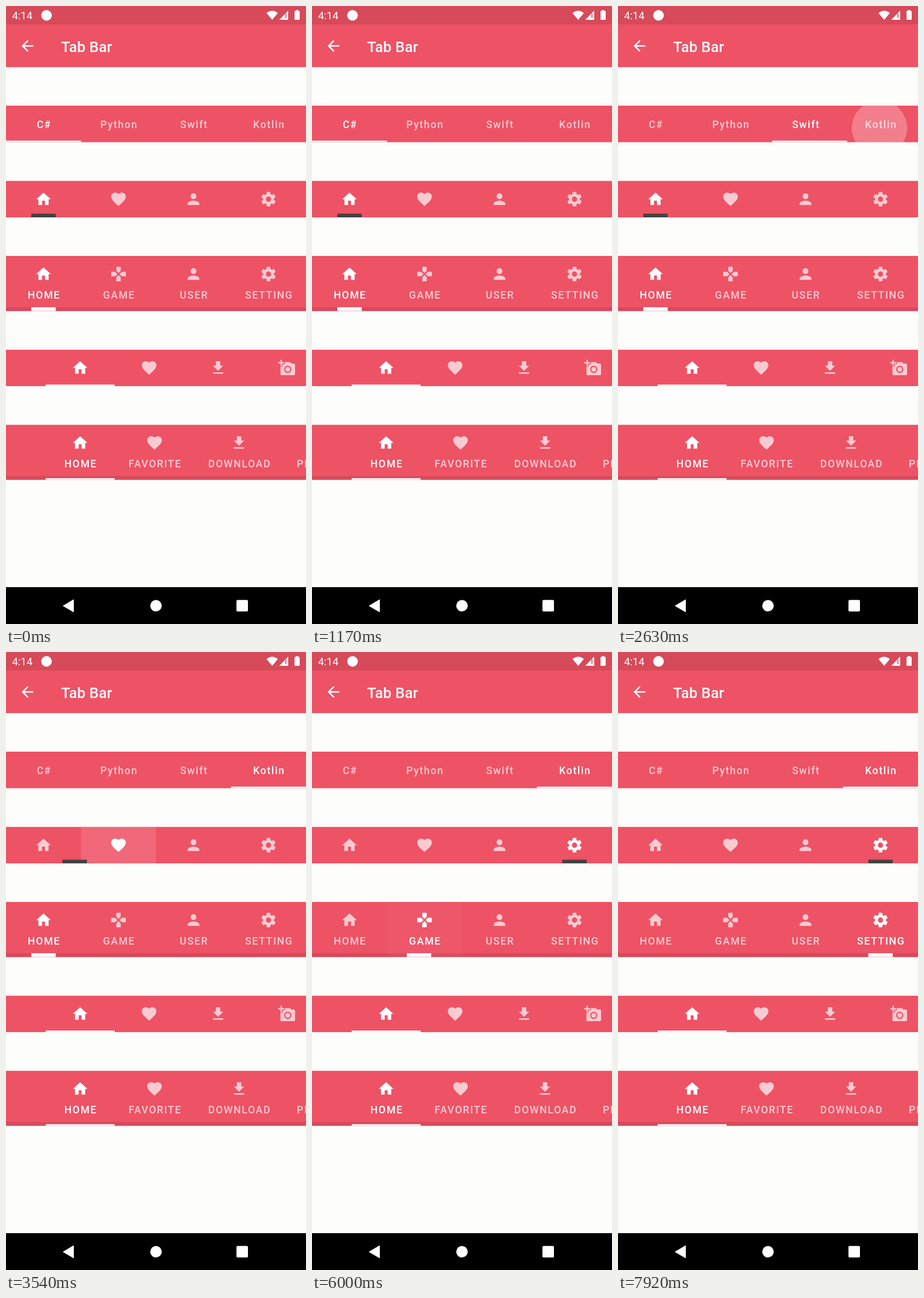
Animation, 522 px wide and 1073 px high, one loop 8 s. Source, as an HTML page:

```html
<!DOCTYPE html>
<html lang="en">
<head>
<meta charset="utf-8">
<title>Tab Bar</title>
<style>
  html, body { margin: 0; width: 100%; height: 100%; overflow: hidden; background: #fdfdfc; }
  svg { display: block; width: 522px; height: 1073px; }
  text { font-family: Roboto, "Noto Sans", sans-serif; fill: #fff; }
  .label { font-size: 17.8px; font-weight: 500; letter-spacing: 1.59px; }
  .mid { text-anchor: middle; }
</style>
</head>
<body>
<svg id="stage" viewBox="0 0 522 1073" xmlns="http://www.w3.org/2000/svg"></svg>
<script>
const RED = '#ee5265', DARK_RED = '#d64a5a', WHITE = '#fff';
const LOOP = 8000, TAB = 130.5, DIM = 0.7, DP = 1.27;
const stage = document.getElementById('stage');

const ICONS = {
  back: 'M20 11H7.83l5.59-5.59L12 4l-8 8 8 8 1.41-1.41L7.83 13H20z',
  home: 'M10 20v-6h4v6h5v-8h3L12 3 2 12h3v8z',
  heart: 'M12 21.35l-1.45-1.32C5.4 15.36 2 12.28 2 8.5 2 5.42 4.42 3 7.5 3c1.74 0 3.41.81 4.5 2.09' +
    'C13.09 3.81 14.76 3 16.5 3 19.58 3 22 5.42 22 8.5c0 3.78-3.4 6.86-8.55 11.54z',
  user: 'M12 12a4 4 0 1 0 0-8 4 4 0 0 0 0 8zm0 2c-2.67 0-8 1.34-8 4v2h16v-2c0-2.66-5.33-4-8-4z',
  game: 'M15 7.5V2H9v5.5l3 3zM7.5 9H2v6h5.5l3-3zM9 16.5V22h6v-5.5l-3-3zM16.5 9l-3 3 3 3H22V9z',
  download: 'M19 9h-4V3H9v6H5l7 7zM5 18v2h14v-2z',
  camera: 'M3 4V1h2v3h3v2H5v3H3V6H0V4zm3 6V7h3V4h7l1.83 2H21a2 2 0 0 1 2 2v12a2 2 0 0 1-2 2H5' +
    'a2 2 0 0 1-2-2V10zm7 9a5 5 0 1 0 0-10 5 5 0 0 0 0 10zm0-1.8a3.2 3.2 0 1 1 0-6.4 3.2 3.2 0 0 1 0 6.4z'
};

function add(tag, attrs, parent = stage) {
  const el = document.createElementNS('http://www.w3.org/2000/svg', tag);
  for (const key in attrs) el.setAttribute(key, attrs[key]);
  parent.appendChild(el);
  return el;
}
const rect = (x, y, width, height, fill, parent) => add('rect', { x, y, width, height, fill }, parent);
const path = (d, parent, fill = WHITE) => add('path', { d, fill }, parent);

function text(str, x, y, attrs, parent) {
  add('text', { x, y, ...attrs }, parent).textContent = str;
}

function icon(name, cx, cy, parent) {
  const g = add('g', { transform: `translate(${cx - 12 * DP} ${cy - 12 * DP}) scale(${DP})` }, parent);
  if (name !== 'gear') return path(ICONS[name], g);
  add('circle', { cx: 12, cy: 12, r: 5.5, fill: 'none', stroke: WHITE, 'stroke-width': 3.8 }, g);
  for (let a = 0; a < 360; a += 60) {
    path('M9 6.4L9.6 2.4Q9.7 2 10.1 2H13.9Q14.3 2 14.4 2.4L15 6.4z', g)
      .setAttribute('transform', `rotate(${a} 12 12)`);
  }
}

// A tab is a group with an optional icon and an optional label.
function tab(cx, name, iconY, label, labelY) {
  const g = add('g', { opacity: DIM });
  if (name) icon(name, cx, iconY, g);
  if (label) text(label, cx + 1, labelY, { class: 'label mid' }, g);
  return g;
}

// A bar of four equal tabs; taps are [time, tab index, ripple x, ripple y].
function tapBar(y, h, names, labels, iconY, labelY, marker, taps, strip) {
  const id = 'clip' + y;
  const clip = add('clipPath', { id });
  const clipRect = rect(0, y, TAB, h, WHITE, clip);
  rect(0, y, 522, h, RED);
  if (strip) rect(0, y + h - 6.5, 522, 6.5, DARK_RED);
  const wave = add('circle', { fill: WHITE, 'clip-path': `url(#${id})`, r: 0 });
  const tabs = [0, 1, 2, 3].map(i =>
    tab(TAB * (i + 0.5), names && names[i], iconY, labels && labels[i], labelY));
  const mark = rect(0, y + h - marker.h, marker.w, marker.h, marker.fill);
  return { tabs, mark, wave, clipRect, taps, inset: (TAB - marker.w) / 2 };
}

// Status bar and app bar
rect(0, 0, 522, 1073, '#fdfdfc');
rect(0, 106, 522, 1, '#f6e9e8');
rect(0, 0, 522, 106, RED);
rect(0, 0, 522, 32, DARK_RED);
text('4:14', 10.5, 23, { 'font-size': 18.4 });
add('circle', { cx: 70.5, cy: 16.2, r: 9.2, fill: WHITE });
path('M453.3 12.3Q463.2 4.2 473 12.3L463.2 24z');
path('M491 8V24H475.500z');
rect(486.3, 13, 1.6, 8, DARK_RED);
path('M504.500 8.500V7h4v1.500h1.500q1 0 1 1V23q0 1-1 1h-7q-1 0-1-1V9.500q0-1 1-1z');
icon('back', 37.3, 69.3);
text('Tab Bar', 96, 79.5, { 'font-size': 25.7, 'font-weight': 500, 'letter-spacing': 0.2 });

const bars = [
  tapBar(173, 63.5, null, ['C#', 'Python', 'Swift', 'Kotlin'], 0, 212,
    { w: TAB, h: 2.7, fill: WHITE },
    [[1350, 1, 194, 210], [1980, 2, 325, 211], [2610, 3, 455, 212]]),
  tapBar(303.7, 63.3, ['home', 'heart', 'user', 'gear'], null, 335.4, 0,
    { w: 42.5, h: 6.4, fill: '#424242' },
    [[3465, 1, 196, 336], [4100, 2, 326, 337], [4730, 3, 456, 337]]),
  tapBar(434, 95.5, ['home', 'game', 'user', 'gear'], ['HOME', 'GAME', 'USER', 'SETTING'], 465.4, 508,
    { w: 42.5, h: 6.5, fill: WHITE },
    [[5800, 1, 196, 484], [6520, 2, 326, 484], [7250, 3, 456, 484]], true)
];

// Scrollable bars, which stay at rest
rect(0, 596.8, 522, 63.2, RED);
['home', 'heart', 'download', 'camera'].forEach((name, i) =>
  tab(129 + 120 * i, name, 628.3).setAttribute('opacity', i ? DIM : 1));
rect(69, 657.3, 120, 2.7, WHITE);

rect(0, 727.2, 522, 95.3, RED);
rect(0, 816.2, 522, 6.3, DARK_RED);
[['home', 'HOME', 129], ['heart', 'FAVORITE', 258.4], ['download', 'DOWNLOAD', 405.500]].forEach(([name, label, x], i) =>
  tab(x, name, 758.4, label, 801).setAttribute('opacity', i ? DIM : 1));
text('PICTURE', 506, 801, { class: 'label', opacity: DIM });
rect(69, 819.8, 120, 2.7, WHITE);

// Navigation bar
rect(0, 1009, 522, 64, '#000');
path('M99.500 1041.500L117.500 1030.800V1052z').setAttribute('stroke', WHITE);
add('circle', { cx: 261, cy: 1041.3, r: 10, fill: WHITE });
add('rect', { x: 401, y: 1031.3, width: 20, height: 20, rx: 2, fill: WHITE });

const clamp = v => Math.min(1, Math.max(0, v));
const mix = (a, b, k) => a + (b - a) * k;

// cubic-bezier(.25, .1, .25, 1)
function ease(x) {
  if (x <= 0 || x >= 1) return clamp(x);
  const curve = (a, b, s) => 3 * a * s * (1 - s) ** 2 + 3 * b * s * s * (1 - s) + s ** 3;
  let lo = 0, hi = 1;
  for (let i = 0; i < 24; i++) {
    const s = (lo + hi) / 2;
    if (curve(0.25, 0.25, s) < x) lo = s; else hi = s;
  }
  return curve(0.1, 1, lo);
}

function drawBar(bar, t) {
  let pos = 0, light = [1, 0, 0, 0], alpha = 0;
  for (const [start, index, x, y] of bar.taps) {
    const p = ease((t - start) / 300);
    const k = clamp((p - 0.08) / 0.32);
    pos = mix(pos, index, p);
    light = light.map((v, i) => mix(v, i === index ? 1 : 0, k));

    const age = t - start + 75;
    if (age > 0 && age < 380) {
      alpha = 0.26 * clamp(age / 60) * (age > 95 ? Math.exp((95 - age) / 80) : 1);
      bar.clipRect.setAttribute('x', index * TAB);
      bar.wave.setAttribute('cx', x);
      bar.wave.setAttribute('cy', y);
      bar.wave.setAttribute('r', Math.min(95, Math.max(0, (age - 10) * 0.56)));
    }
  }
  bar.wave.setAttribute('opacity', alpha);
  bar.mark.setAttribute('x', pos * TAB + bar.inset);
  bar.tabs.forEach((g, i) => g.setAttribute('opacity', mix(DIM, 1, light[i])));
}

function draw(t) {
  bars.forEach(bar => drawBar(bar, t));
}

const begin = performance.now();
function loop() {
  draw((performance.now() - begin) % LOOP);
  requestAnimationFrame(loop);
}
draw(0);
requestAnimationFrame(loop);
</script>
</body>
</html>
```
